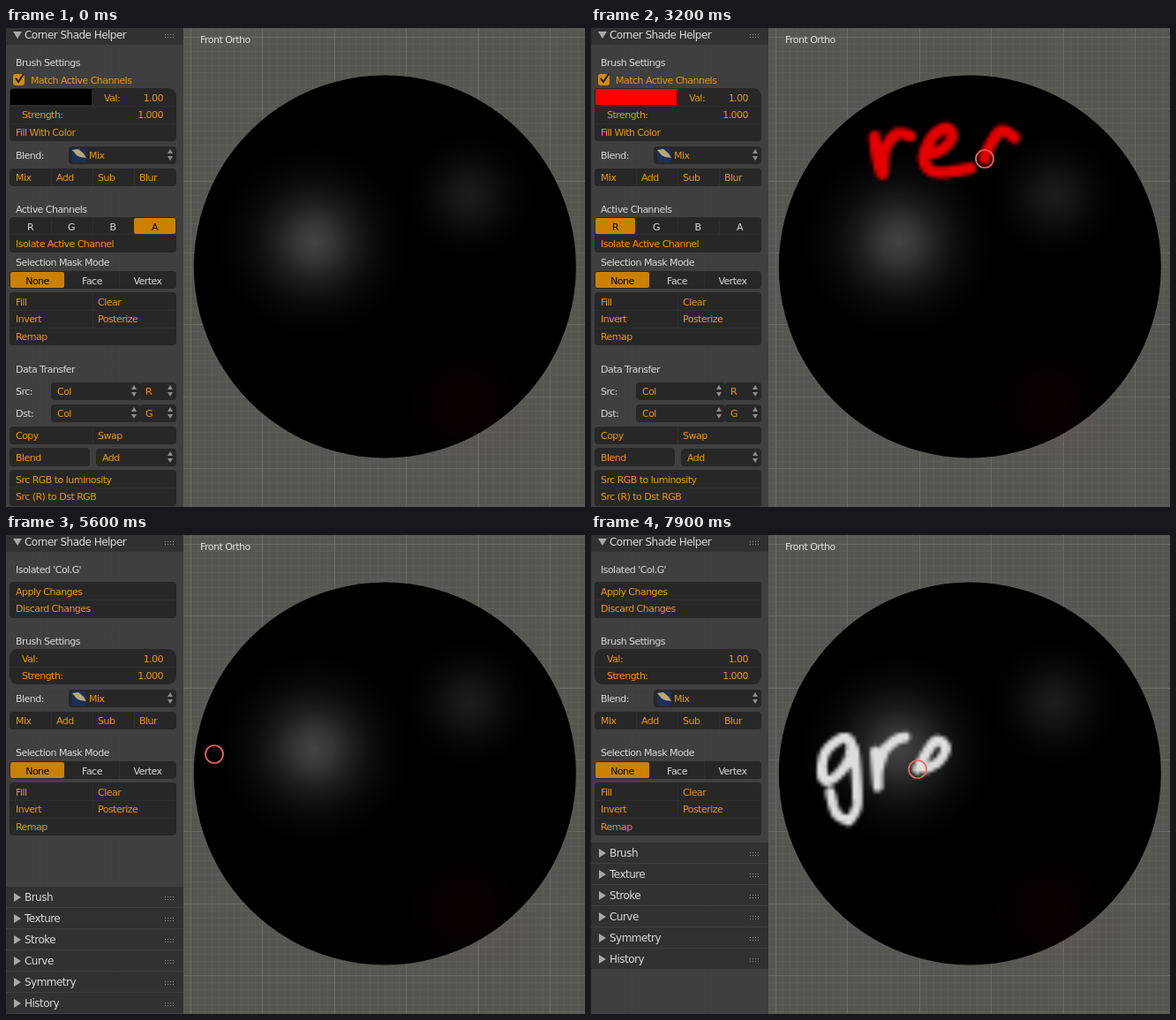
Animation, 656 px wide and 542 px high, one loop 8000 ms. Source, as an HTML page with a canvas:

```html
<!DOCTYPE html>
<html lang="en">
<head>
<meta charset="utf-8">
<title>Channel painting</title>
<style>
html, body { margin: 0; width: 100%; height: 100%; overflow: hidden; background: #3f3f3f; }
canvas { display: block; }
</style>
</head>
<body>
<canvas id="stage" width="656" height="542"></canvas>
<script>
const W = 656, H = 542, LOOP = 8000, CELL = 4;
const ctx = document.getElementById('stage').getContext('2d');
const paintLayer = document.createElement('canvas');
paintLayer.width = W / CELL;
paintLayer.height = Math.ceil(H / CELL);
const pctx = paintLayer.getContext('2d');

const ORANGE = '#ee9600', ACTIVE = '#cb8000', LABEL = '#d9d9d9', FIELD = '#272727', HOVER = '#3a3a3a';

// Brush moves: start time, ms per point, colour (empty = hovering), points. No points = brush outside the view.
const RED = '#e40000', WHITE = '#dedede';
const moves = [
  [0, 100, '', ''],
  [300, 200, '', '614,2 340,105'],
  [600, 100, '', ''],
  [1500, 100, '', '340,165'],
  [1600, 100, RED, '321,123 324,145 330,165 333,138 346,120 362,122'],
  [2200, 100, '', '374,138'],
  [2300, 100, RED, '382,143 398,137 409,123 402,113 386,124 377,148 390,163 430,159'],
  [3100, 50, RED, '480,124 463,117 446,148 454,162 468,156 480,138 484,122'],
  [3500, 100, RED, '473,97 481,114 493,138 512,161'],
  [3900, 100, '', '490,170 390,170 262,170'],
  [4200, 100, '', ''],
  [5600, 100, '', '236,248 252,246 270,246 288,247'],
  [6000, 100, WHITE, '295,246 293,232 282,231 265,247 262,273 272,277 289,260 297,240 301,275 301,308 292,323'],
  [7050, 50, WHITE, '292,323 278,315 271,291'],
  [7200, 50, WHITE, '322,245 325,284 325,270 328,256 333,243 338,238 344,233 350,230 356,229'],
  [7700, 50, WHITE, '380,264 394,256 402,240 389,234 370,265']
].map(([start, step, color, pts]) =>
  ({ start, step, color, pts: pts ? pts.split(' ').map(p => p.split(',').map(Number)) : [] }));

// Catmull-Rom position at fractional point index u
function along(pts, u) {
  const last = pts.length - 1, i = Math.min(Math.floor(u), Math.max(last - 1, 0)), f = u - i;
  const at = k => pts[Math.max(0, Math.min(last, k))];
  return [0, 1].map(d => {
    const a = at(i - 1)[d], b = at(i)[d], c = at(i + 1)[d], e = at(i + 2)[d];
    return b + f / 2 * (c - a + f * (2 * a - 5 * b + 4 * c - e + f * (3 * (b - c) + e - a)));
  });
}
const progress = (m, t) => Math.min((t - m.start) / m.step, m.pts.length - 1);

function rect(x, y, w, h, fill, r = 0) {
  ctx.fillStyle = fill;
  ctx.beginPath();
  ctx.roundRect(x, y, w, h, r);
  ctx.fill();
}
function text(s, x, y, color = ORANGE, align = 'left', size = 11) {
  ctx.font = size + 'px "DejaVu Sans", sans-serif';
  ctx.letterSpacing = '-0.53px';
  ctx.textAlign = align;
  ctx.fillStyle = color;
  ctx.fillText(s, x, y + 4);
}
const label = (s, y) => text(s, 11, y, LABEL);
function poly(color, ...p) {
  ctx.fillStyle = color;
  ctx.beginPath();
  for (let i = 0; i < p.length; i += 2) ctx.lineTo(p[i], p[i + 1]);
  ctx.fill();
}
const box = (y, h, x = 4, w = 189, r = 4) => rect(x, y, w, h, FIELD, r);
const hline = y => rect(5, y, 187, 1, '#2f2f2f');
const vline = (x, y, h) => rect(x, y, 1, h, '#303030');

function dropdown(s, x, y, w, textX = x + 7) {
  box(y - 10, 20, x, w);
  text(s, textX, y);
  const a = x + w - 7;
  poly('#8d8d8d', a - 3, y - 2, a, y - 7, a + 3, y - 2);
  poly('#8d8d8d', a - 3, y + 1, a, y + 6, a + 3, y + 1);
}
function choice(s, x, y, w, on, hover) {
  if (on || hover) rect(x, y, w, 18, on ? ACTIVE : HOVER, 2);
  text(s, x + w / 2, y + 10, on ? '#000' : LABEL, 'center');
}
function header(s, y, open) {
  rect(0, y - 12, 201, 23, '#313131');
  if (open) poly('#a8a8a8', 8, y - 4, 18, y - 4, 13, y + 4);
  else poly('#a8a8a8', 9, y - 5, 17, y, 9, y + 5);
  text(s, 21, y, LABEL, 'left', 12);
  for (let i = 0; i < 8; i++) rect(180 + i % 4 * 3, y + (i < 4 ? -1 : 2), 1, 1, '#8a8a8a');
}

function blendRows(y) {
  label('Blend:', y);
  dropdown('Mix', 71, y, 122, 94);
  rect(75, y - 8, 16, 16, '#1d2f55', 2);
  poly('#b8a878', 75, y - 6, 82, y - 7, 88, y - 2, 91, y + 3, 84, y + 2, 80, y);
  box(y + 15, 20);
  ['Mix', 'Add', 'Sub', 'Blur'].forEach((s, i) => {
    if (i) vline(4 + i * 47, y + 15, 20);
    text(s, [11, 57, 104, 151][i], y + 25);
  });
}
function maskRows(y) {
  label('Selection Mask Mode', y);
  box(y + 10, 20);
  choice('None', 5, y + 11, 61, true);
  choice('Face', 67, y + 11, 61);
  choice('Vertex', 129, y + 11, 63);
  vline(128, y + 10, 20);
  box(y + 34, 60);
  hline(y + 54);
  hline(y + 74);
  vline(98, y + 35, 39);
  text('Fill', 11, y + 45);
  text('Clear', 104, y + 45);
  text('Invert', 11, y + 64);
  text('Posterize', 104, y + 64);
  text('Remap', 11, y + 84);
}

function channelPanel(t) {
  const active = t < 1200 ? 3 : t < 4800 ? 0 : 1;
  label('Brush Settings', 39);
  rect(8, 52, 13, 13, '#d08a12', 3);
  ctx.strokeStyle = '#1b1300';
  ctx.lineWidth = 2;
  ctx.beginPath();
  ctx.moveTo(11, 57);
  ctx.lineTo(14, 61);
  ctx.lineTo(20, 52);
  ctx.stroke();
  text('Match Active Channels', 28, 59);

  box(68, 60, 4, 189, [4, 9, 4, 4]);
  rect(5, 69, 92, 18, ['#f00', '#0f0', '', '#000'][active], [3, 0, 0, 0]);
  hline(88);
  hline(108);
  text('Val:', 111, 79);
  text('1.00', 178, 79, ORANGE, 'right');
  text('Strength:', 18, 98);
  text('1.000', 178, 98, ORANGE, 'right');
  text('Fill With Color', 11, 118);
  blendRows(144);

  label('Active Channels', 205);
  box(214, 40);
  [...'RGBA'].forEach((s, i) => {
    if (i) vline(4 + i * 47, 215, 18);
    const hover = i === 0 && t >= 1100 && t < 1200 || i === 1 && t >= 4500 && t < 4800;
    choice(s, [5, 51, 98, 145][i], 215, [45, 46, 46, 47][i], i === active, hover);
  });
  hline(233);
  const pressed = t >= 5400;
  if (pressed) rect(5, 234, 187, 19, ACTIVE, 3);
  text('Isolate Active Channel', 11, 244, pressed ? '#000' : t >= 5000 ? '#ffb02a' : ORANGE);
  maskRows(265);

  label('Data Transfer', 386);
  [['Src:', 'R', 411], ['Dst:', 'G', 436]].forEach(([s, c, y]) => {
    label(s, y);
    dropdown('Col', 51, y, 101);
    dropdown(c, 151, y, 42);
  });
  box(451, 20);
  vline(98, 451, 20);
  text('Copy', 11, 461);
  text('Swap', 104, 461);
  box(475, 21, 4, 91);
  text('Blend', 11, 486);
  dropdown('Add', 102, 486, 91);
  box(500, 41);
  hline(520);
  text('Src RGB to luminosity', 11, 511);
  text('Src (R) to Dst RGB', 11, 530);
}

function isolatedPanel(t) {
  label("Isolated 'Col.G'", 39);
  box(53, 41);
  hline(73);
  text('Apply Changes', 11, 64);
  text('Discard Changes', 11, 83);
  label('Brush Settings', 120);
  box(129, 40, 4, 189, 9);
  hline(149);
  text('Val:', 18, 140);
  text('1.00', 178, 140, ORANGE, 'right');
  text('Strength:', 18, 159);
  text('1.000', 178, 159, ORANGE, 'right');
  blendRows(185);
  maskRows(246);
  const slide = Math.round(50 * (1 - Math.sqrt(Math.min((t - 5600) / 300, 1))));
  ['Brush', 'Texture', 'Stroke', 'Curve', 'Symmetry', 'History'].forEach((s, i) =>
    header(s, 360 + slide + i * 24));
}

function panel(t) {
  rect(0, 0, 201, H, 'rgba(61,61,61,.9)');
  header('Corner Shade Helper', 8, true);
  if (t < 5600) channelPanel(t);
  else isolatedPanel(t);
}

function grid() {
  rect(0, 0, W, H, '#575652');
  const unit = 8.14;
  for (const major of [false, true]) {
    const color = major ? '#6a6965' : '#5d5c58', step = major ? unit * 10 : unit;
    for (let x = 209.4 % step; x < W; x += step) rect(Math.floor(x), 0, 1, H, color);
    for (let y = 10.2 % step; y < H; y += step) rect(0, Math.floor(y), W, 1, color);
  }
}

function glow(x, y, r, ...stops) {
  const g = ctx.createRadialGradient(x, y, 0, x, y, r);
  stops.forEach((c, i) => g.addColorStop(i / (stops.length - 1), c));
  ctx.globalCompositeOperation = 'lighter';
  rect(x - r, y - r, 2 * r, 2 * r, g);
  ctx.globalCompositeOperation = 'source-over';
}
function sphere() {
  ctx.fillStyle = '#000';
  ctx.beginPath();
  for (let i = 0; i < 96; i++) {
    const a = i / 96 * 2 * Math.PI;
    ctx.lineTo(429.3 + 216.5 * Math.cos(a), 270 + 216.5 * Math.sin(a));
  }
  ctx.fill();
  glow(349, 242, 110, '#434343', '#343434', '#1d1d1d', '#0d0d0d', '#040404', '#000');
  glow(525, 190, 75, '#1c1c1c', '#151515', '#0b0b0b', '#030303', '#000');
  glow(518, 425, 65, '#0c0000', '#070000', '#000');
}

// Strokes are laid down on a coarse mesh and smoothed when enlarged
function strokes(t) {
  pctx.clearRect(0, 0, W, H);
  pctx.lineCap = pctx.lineJoin = 'round';
  const ink = t < 5600 ? RED : WHITE;
  for (const m of moves) {
    if (m.color !== ink || m.start > t) continue;
    pctx.strokeStyle = ink;
    pctx.lineWidth = (ink === RED ? 13 : 11.5) / CELL;
    pctx.beginPath();
    const end = progress(m, t);
    for (let u = 0; u < end + 0.1; u += 0.1) {
      const [x, y] = along(m.pts, Math.min(u, end));
      pctx.lineTo(x / CELL, y / CELL);
    }
    pctx.stroke();
  }
  ctx.drawImage(paintLayer, 0, 0, paintLayer.width * CELL, paintLayer.height * CELL);
}

function brush(t) {
  const m = moves.filter(m => m.start <= t).pop();
  if (!m.pts.length) return;
  const [x, y] = along(m.pts, progress(m, t));
  ctx.strokeStyle = '#f4655f';
  ctx.lineWidth = 1.7;
  ctx.beginPath();
  ctx.arc(x, y, 10, 0, 2 * Math.PI);
  ctx.stroke();
}

function draw() {
  const t = Math.floor(performance.now() % LOOP / 100) * 100;
  grid();
  sphere();
  strokes(t);
  brush(t);
  text('Front Ortho', 220, 13, '#dedede');
  panel(t);
  requestAnimationFrame(draw);
}
draw();
</script>
</body>
</html>
```
